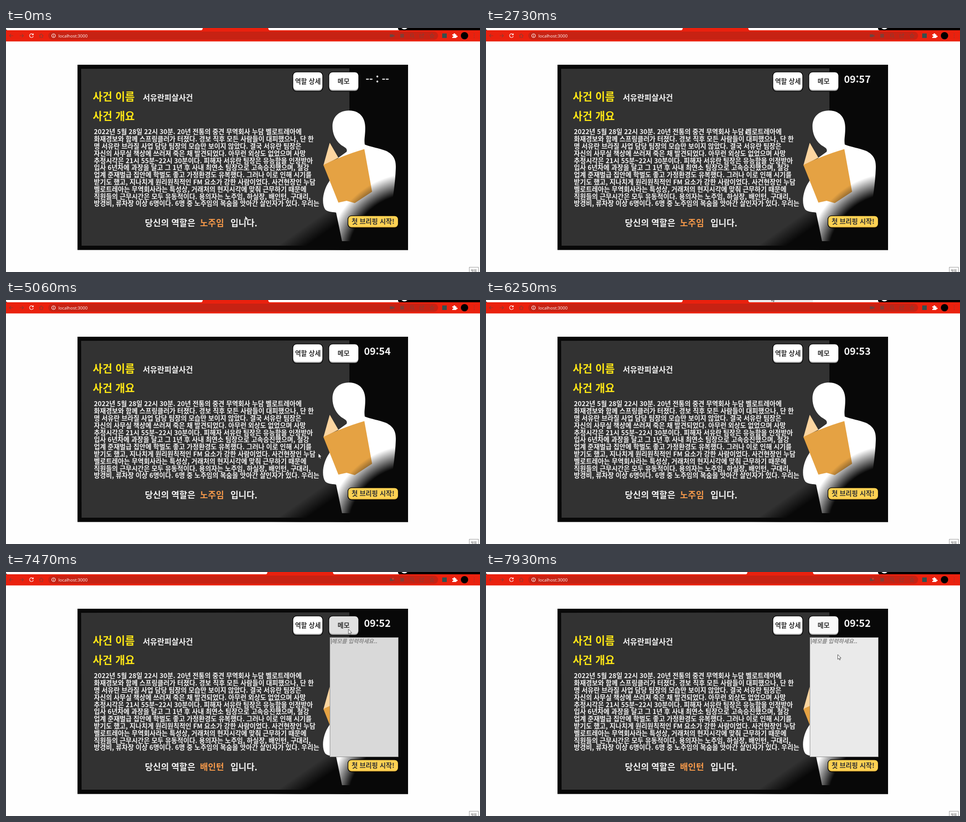
These frames come from a looping animation (1041 by 538 pixels, 8000 ms). An HTML page:

```html
<!DOCTYPE html>
<html lang="ko">
<head>
<meta charset="utf-8">
<style>
  html, body { margin: 0; width: 100%; height: 100%; overflow: hidden; background: #fefefe; }
  svg { display: block; width: 1041px; height: 538px; }
  text { font-family: "Noto Sans CJK KR", "Noto Sans CJK", sans-serif; font-weight: 700; fill: #f4f4f4; white-space: pre; }
  .head { font-size: 23.3px; fill: #ffe715; }
  .line { font-size: 19.1px; }
  .label { font-size: 14.3px; fill: #333; text-anchor: middle; }
  .dim { fill: none; stroke: #8d3b31; stroke-width: 1.2; }
  .lit { fill: none; stroke: #fff; stroke-width: 1.2; }
</style>
</head>
<body>
<svg viewBox="0 0 1041 538">
  <defs>
    <linearGradient id="floorShade" gradientUnits="userSpaceOnUse" x1="425" y1="600" x2="446" y2="630">
      <stop offset="0" stop-color="#080808" stop-opacity="0"/>
      <stop offset="1" stop-color="#080808"/>
    </linearGradient>
    <radialGradient id="bodyShade" gradientUnits="userSpaceOnUse" cx="895" cy="510" r="190">
      <stop offset=".76" stop-color="#080808"/>
      <stop offset="1" stop-color="#080808" stop-opacity="0"/>
    </radialGradient>
  </defs>

  <!-- browser bar -->
  <rect width="1041" height="6"/>
  <path d="M0 0H861V1Q861 5 865 5H4Q0 5 0 2Z" fill="#fff"/>
  <rect id="tabHover" x="576" width="142" height="5" fill="#ebe9e9"/>
  <circle cx="875" cy="-5" r="8" fill="#fff"/>
  <rect y="5" width="1041" height="24.600" fill="#ea210e"/>
  <path id="tab" d="M-4 5Q0 5 0 0H144Q144 5 148 5V6H-4Z" fill="#ea210e"/>
  <rect x="93" y="8" width="856" height="18" rx="9" fill="#c72213"/>
  <path class="dim" d="M16 17H8M11 13.5L7.5 17L11 20.5M30 17H38M35 13.5L38.5 17L35 20.5M73 17L77.500 13L82 17M74.500 16V21H80.500V16"/>
  <path class="lit" d="M59.500 14.500A4.200 4.200 0 1 0 60 18M60 12V15.200H56.800"/>
  <circle class="lit" cx="104.500" cy="17" r="4"/>
  <path class="lit" d="M104.500 16.500V19.500M104.500 14.300V15.400"/>
  <text x="115" y="20.500" style="font:9.5px 'Open Sans',sans-serif;fill:#fff">localhost:3000</text>
  <path d="M843 14H850V16L853 14.500V19.500L850 18V20H843Z" fill="#70433d"/>
  <circle id="camDot" cx="850" cy="15" r="2.200" fill="#d63a26"/>
  <rect x="866" y="13" width="8" height="8" fill="#853c33"/>
  <path class="dim" d="M894 19L897 22M889.500 16H893.500M912 14H909V21H916V18M912 18Q912 14.500 917 14.500M915 12L918 14.500L915 17"/>
  <circle class="dim" cx="891.500" cy="16" r="3.500"/>
  <path class="dim" d="M935.500 12.500L936.800 15.600L940 15.900L937.600 18L938.300 21.200L935.500 19.500L932.700 21.200L933.400 18L931 15.900L934.200 15.600Z"/>
  <rect x="958" y="12" width="10" height="10" fill="#36504e"/>
  <path d="M980 14H983A1.800 1.800 0 1 1 986.500 14H989V17A1.800 1.800 0 1 1 989 20V22H980V19.500A1.700 1.700 0 1 0 980 16.500Z" fill="#fff"/>
  <circle cx="1007" cy="17" r="8"/>
  <path d="M1027.500 12.500h1.500v1.500h-1.500zm0 4h1.500v1.500h-1.500zm0 4h1.500v1.500h-1.500z" fill="#8d3b31"/>

  <!-- game board -->
  <rect x="157" y="81" width="726" height="408.500" fill="#080808"/>
  <path d="M165 90L754 89L755 480H166Z" fill="#323232"/>
  <path d="M500 489.500V440L755 300V489.500Z" fill="url(#floorShade)"/>
  <path d="M753 182C777 182 789 198 789 220C789 238 786 246 788 257C800 262 820 265 835 271C852 280 857 291 856 310C855 340 850 372 846 400L840 470H738L725 407C714 405 707 406 701 400C692 386 696 358 710 338L730 286L748 273C751 265 743 263 736 258C724 248 717 234 717 217C717 196 731 182 753 182Z" fill="#fff"/>
  <path d="M711 253L730 286L697 303Z" fill="#fcd5a0"/>
  <path d="M697 302Q740 281 787 267L804 361L766 386L748 381L730 385Z" fill="#e5a243"/>
  <path d="M700 489.500V300H883V489.500Z" fill="url(#bodyShade)"/>

  <text class="head" x="190.500" y="160">사건 이름</text>
  <text class="head" x="190.500" y="203">사건 개요</text>
  <text x="300.500" y="160" font-size="17.1">서유란피살사건</text>
  <g id="story" font-size="14.35" word-spacing="-.2"></g>
  <text class="line" x="305" y="437">당신의 역할은</text>
  <text class="line" id="role" x="426" y="437" style="fill:#f5994a"></text>
  <text class="line" x="493" y="437">입니다.</text>

  <g stroke="#000" stroke-width="1.5">
    <rect x="630" y="97" width="65.500" height="42.500" rx="8" fill="#9b9b9b"/>
    <rect x="709" y="97" width="65.500" height="42.500" rx="8" fill="#9b9b9b"/>
    <rect x="751" y="414" width="110.500" height="26.500" rx="8" fill="#b58a28"/>
  </g>
  <rect x="630.800" y="97.800" width="64" height="38.700" rx="7.500" fill="#fff"/>
  <rect id="memoButton" x="709.800" y="97.800" width="64" height="38.700" rx="7.500"/>
  <rect x="751.800" y="414.800" width="109" height="23.700" rx="7" fill="#fdd153"/>
  <text class="label" x="663" y="123.300">역할 상세</text>
  <text class="label" x="741.500" y="123.300">메모</text>
  <text class="label" x="806" y="432.300" style="font-size:14.6px">첫 브리핑 시작!</text>
  <text id="clock" x="815.500" y="121.300" font-size="21.8" text-anchor="middle"></text>

  <g id="memo">
    <rect id="paper" x="711.500" y="144.500" width="150" height="263" stroke="#8c8c8c"/>
    <text x="715" y="157" style="font-size:12.1px;font-style:italic;fill:#8b8b8b">메모를 입력하세요..</text>
    <path d="M714.500 146.500V159" stroke="#555"/>
  </g>

  <rect x="1017.500" y="527.500" width="20" height="12" fill="#fff" stroke="#999"/>
  <text x="1021" y="538" style="font-size:7px;font-weight:400;fill:#333">젓지</text>
  <path id="cursor" d="M0 0V10.500L2.400 8.300L4 12L5.700 11.300L4.200 7.800H7.400Z" fill="#fff" stroke="#222" stroke-width=".8"/>
</svg>
<script>
const LOOP = 8000;
const SWITCH_TAB = 6390, OPEN_MEMO = 7460;
const STORY = [
  '2022년 5월 28일 22시 30분. 20년 전통의 중견 무역회사 누담 벨로트레아에',
  '화재경보와 함께 스프링클러가 터졌다. 경보 직후 모든 사람들이 대피했으나, 단 한',
  '명 서유란 브라질 사업 담당 팀장의 모습만 보이지 않았다. 결국 서유란 팀장은',
  '자신의 사무실 책상에 쓰러져 죽은 채 발견되었다. 아무런 외상도 없었으며 사망',
  '추정시각은 21시 55분~22시 30분이다. 피해자 서유란 팀장은 유능함을 인정받아',
  '입사 6년차에 과장을 달고 그 1년 후 사내 최연소 팀장으로 고속승진했으며, 철강',
  '업계 준재벌급 집안에 학벌도 좋고 가정환경도 유복했다. 그러나 이로 인해 시기를',
  '받기도 했고, 지나치게 원리원칙적인 FM 요소가 강한 사람이었다. 사건현장인 누담',
  '벨로트레아는 무역회사라는 특성상, 거래처의 현지시각에 맞춰 근무하기 때문에',
  '직원들의 근무시간은 모두 유동적이다. 용의자는 노주임, 하실장, 배인턴, 구대리,',
  '방경비, 류차장 이상 6명이다. 6명 중 노주임의 목숨을 앗아간 살인자가 있다. 우리는',
];
// Pointer moves: start, end, x, y reached at the end
const MOVES = [
  [1540, 2130, 643, 241],
  [2400, 2730, 569.5, 225],
  [2870, 3060, 639, 199],
  [3340, 4000, 753, 194],
  [4340, 5060, 686, 338],
  [5200, 5920, 627, -8],
  [6400, 7190, 754, 133.5],
  [7200, 7330, 752, 126],
  [7460, 7800, 772.5, 182],
];

const $ = id => document.getElementById(id);
const clamp = v => Math.min(1, Math.max(0, v));
const progress = (t, from, to) => clamp((t - from) / (to - from));
const smooth = p => p * p * (3 - 2 * p);
const gray = v => `rgb(${[v, v, v].map(Math.round)})`;
const show = (id, on) => $(id).setAttribute('visibility', on ? 'visible' : 'hidden');

$('story').innerHTML = STORY.map((line, i) =>
  `<text x="193" y="${234.3 + i * 15.8}">${line}</text>`).join('');

function pointer(t) {
  let x = 525, y = 414;
  for (const [from, to, endX, endY] of MOVES) {
    const p = smooth(progress(t, from, to));
    x += (endX - x) * p;
    y += (endY - y) * p;
  }
  return [x, y];
}

function render(t) {
  const second = t >= SWITCH_TAB;
  $('tab').setAttribute('transform', `translate(${second ? 574 : 432})`);
  show('tabHover', t >= 5860 && !second);
  show('camDot', second);
  $('role').textContent = second ? '배인턴' : '노주임';
  $('clock').textContent = t < 60 ? '-- : --' : '09:' + (59 - Math.floor((t + 10) / 1010));

  const hover = progress(t, 7060, 7190) * 31 - progress(t, 7600, 7930) * 25;
  $('memoButton').setAttribute('fill', gray(255 - hover));
  show('memo', t >= OPEN_MEMO);
  $('paper').setAttribute('fill', gray(Math.max(217, 225 + (t - 7800) * 0.07)));

  $('cursor').setAttribute('transform', `translate(${pointer(t)})`);
}

function frame() {
  render(performance.now() % LOOP);
  requestAnimationFrame(frame);
}
frame();
</script>
</body>
</html>
```
